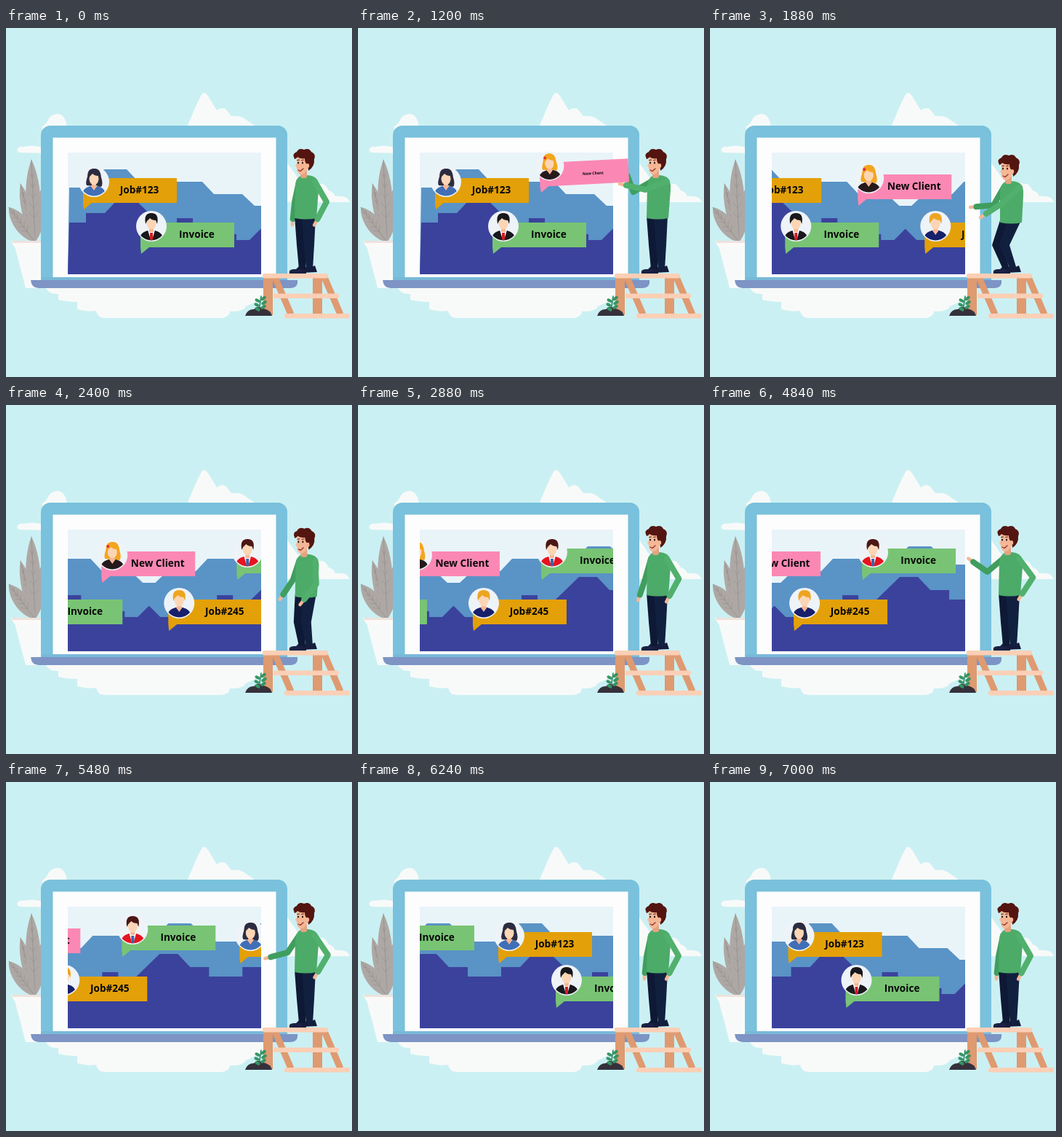
Write an HTML page with a canvas that moves like this. It is 476x479 px and loops after 7.04 s.

```html
<!DOCTYPE html>
<html lang="en">
<head>
<meta charset="utf-8">
<title>Scrolling job board</title>
<style>
html, body { margin: 0; width: 100%; height: 100%; overflow: hidden; background: #cbf0f3; }
canvas { display: block; }
</style>
</head>
<body>
<canvas id="stage" width="476" height="479"></canvas>
<script>
const ctx = document.getElementById('stage').getContext('2d');
const LOOP = 7040, STEP = 40, PERIOD = 527, MIRROR = 350.5;
const SCREEN = [85, 171, 266, 167];
const CARD_LANDS = 1560;
const SKIN = '#f5b795', NAVY = '#12203f', GREEN = '#4cab68', HAIR = '#541510', WHITE = '#f8faf9';

const clamp = (v, lo, hi) => Math.min(hi, Math.max(lo, v));
const mix = (a, b, p) => a + (b - a) * p;
const ease = (t, from, to) => {
  const p = clamp((t - from) / (to - from), 0, 1);
  return p * p * (3 - 2 * p);
};

// A skyline is a row of plateaus [from, to, top]; its other half is the mirror image
function skyline(plateaus) {
  const half = plateaus.flatMap(([from, to, top]) => [[from, top], [to, top]]);
  const whole = [...half, ...half.map(([x, y]) => [2 * MIRROR - x, y]).reverse()];
  return [[85, 338], ...whole, ...whole.map(([x, y]) => [x + PERIOD, y]), [85 + 2 * PERIOD, 338]];
}
const hills = skyline([[87, 108, 219], [135, 166, 194], [182, 270, 211], [286, 325, 228], [342, 350, 244]]);
const towers = skyline([[87, 110, 267], [110, 136, 254], [153, 178, 236], [210, 235, 267], [235, 257, 261],
  [257, 296, 267], [296, 317, 283], [317, 335, 291], [350, 350, 276]]);

const JOB = '#e3a008', BILL = '#78c474', CLIENT = '#fb88b4';
const cards = [
  { x: 106, y: 206, fill: JOB, text: 'Job#123', face: { hair: '#2c2c40', suit: '#416fb6', bob: true } },
  { x: 185, y: 267, fill: BILL, text: 'Invoice', face: { hair: '#17171c', suit: '#18181d', tie: '#d21c24' } },
  { x: 377, y: 267, fill: JOB, text: 'Job#245', face: { hair: '#eda520', suit: '#17206a' } },
  { x: 471, y: 197, fill: BILL, text: 'Invoice', face: { hair: '#4b1714', suit: '#e5141f', tie: '#3a63a8' } }
];
const newClient = { x: 285, y: 201, fill: CLIENT, text: 'New Client',
  face: { hair: '#f3a61d', suit: '#25191c', bob: true, flower: true } };

// Angles in degrees (90 hangs straight down): near upper arm, near forearm,
// far upper arm, far forearm; then how far the body leans
const idle = [60, 118, 102, 96, 0];
const hold = [160, 193, 150, 250, 0];
const push = [138, 147, 120, 175, 1];
const point = [53, 123, 140, 215, 0];
const moves = [[0, 720, hold], [1240, 1880, push], [1920, 2720, idle], [2680, 3680, point], [5000, 6080, idle]];

function poseAt(t) {
  return moves.reduce((pose, [from, to, goal]) => {
    const p = ease(t, from, to);
    return pose.map((v, i) => mix(v, goal[i], p));
  }, idle);
}

// A quick start with a long slowdown, then a second eased run to the loop point
function scrollAt(t) {
  const run = clamp(t - 1240, 0, 2360);
  const travelled = run < 100 ? run * run / 200 : run - 50;
  const first = .1385 * (travelled - Math.max(0, run - 1522) ** 2 / 1676);
  return first + 265 * ease(t, 4860, 7097);
}

function poly(points, fill) {
  ctx.beginPath();
  points.forEach(([x, y]) => ctx.lineTo(x, y));
  ctx.fillStyle = fill;
  ctx.fill();
}
function shape(d, fill) { ctx.fillStyle = fill; ctx.fill(new Path2D(d)); }
function rect(x, y, w, h, fill, r = 0) {
  ctx.beginPath();
  ctx.roundRect(x, y, w, h, r);
  ctx.fillStyle = fill;
  ctx.fill();
}
function oval(x, y, rx, ry, fill, turn = 0) {
  ctx.beginPath();
  ctx.ellipse(x, y, rx, ry, turn, 0, 7);
  ctx.fillStyle = fill;
  ctx.fill();
}
function line(points, color, width, cap = 'round') {
  ctx.beginPath();
  points.forEach(([x, y]) => ctx.lineTo(x, y));
  Object.assign(ctx, { strokeStyle: color, lineWidth: width, lineCap: cap, lineJoin: 'round' });
  ctx.stroke();
}
function placed(x, y, paint) {
  ctx.save();
  ctx.translate(x, y);
  paint();
  ctx.restore();
}

// A pointed leaf from the pot up to its tip, with a vein and ribs
function drawLeaf(tipX, tipY, width) {
  const baseX = 40, baseY = 294, vein = '#958f8d';
  const length = Math.hypot(tipX - baseX, tipY - baseY);
  placed(baseX, baseY, () => {
    ctx.rotate(Math.atan2(tipX - baseX, baseY - tipY));
    shape(`M0 0C${-width} ${-length * .3} ${-width * .7} ${-length * .8} 0 ${-length}`
      + `C${width * .7} ${-length * .8} ${width} ${-length * .3} 0 0Z`, '#aea8a5');
    line([[0, 0], [0, -length]], vein, .8);
    for (let p = .3; p < .85; p += .12) {
      const reach = width * .45 * (1.1 - p);
      line([[-reach, -length * p - 6], [0, -length * p], [reach, -length * p - 6]], vein, .6);
    }
  });
}

function drawScenery() {
  rect(0, 0, 476, 479, '#cbf0f3');
  shape('M249 136L260 110Q267 94 271 89Q275 88 279 95L290 113Q296 108 302 111L310 121Q320 120 326 123L345 136Z', WHITE);
  shape('M15 168Q16 162 25 163Q38 160 50 164L50 135Q55 132 57 128Q61 118 71 118Q81 118 84 135L60 172L18 171Z', WHITE);
  shape('M386 184L401 205L432 214Q438 212 444 223Q451 225 453 231Q470 229 473 239L386 239Z', WHITE);
  shape('M54 355Q58 366 72 365V373Q84 376 98 376V386Q112 390 124 388Q126 398 136 398H297Q307 397 308 389Q326 390 330 382L352 372L360 355Z', WHITE);

  drawLeaf(52, 216, 13);
  drawLeaf(20, 214, 12);
  drawLeaf(35, 181, 16);
  drawLeaf(4, 246, 16);
  shape('M7 292H56V300H11Z', '#fcfaf8');
  shape('M12 300H56V357H27Z', WHITE);
  shape('M8 292H56L55 295H9Z', '#eee2dd');

  rect(48, 134, 339, 218, '#79c1dc', 13);
  rect(64.5, 150.5, 307, 191.5, '#fdfdfe');
  shape('M34 346H401V350Q400 357 391 357H45Q35 357 34 346Z', '#7d94c5');
  rect(48, 342, 339, 4, '#79b9d8');
}

function drawStool() {
  const wood = '#df9a70', plank = '#fbcfb5';
  for (const x of [354, 422]) {
    line([[x + 16, 342], [x + 38, 393]], wood, 9, 'butt');
    rect(x, 341, 13, 53, wood);
  }
  for (let step = 0; step < 3; step++) rect(353 + step * 15, 337 + step * 27.5, 90, 6.5, plank, 2);

  shape('M329 395Q332 386 341 386Q347 380 354 385Q364 387 366 395Z', '#35313b');
  line([[348, 388], [351, 368]], '#2f875a', 1.6);
  for (let i = 0; i < 3; i++) {
    oval(346 - i % 2, 386 - i * 6, 3.8, 2.1, '#379465', .5);
    oval(354 + i % 2, 383 - i * 6, 4.2, 2.2, '#379465', -.6);
  }
}

function drawAvatar({ hair, suit, tie, bob, flower }) {
  ctx.save();
  oval(0, 0, 21, 21, '#eef3f8');
  ctx.beginPath();
  ctx.arc(0, 0, 19.5, 0, 7);
  ctx.clip();
  if (bob) shape('M-10 5Q-12 2 -9 -7Q-8 -18 1 -18Q9 -18 10 -6Q13 3 10 7Z', hair);
  shape('M-16 20Q-17 9 -5 6H5Q17 9 16 20Z', suit);
  shape(tie ? 'M-5 5H5L1 19H-1Z' : 'M-5 5H5L0 12Z', tie ? '#fff' : SKIN);
  rect(-3, 1, 6, 7, SKIN);
  if (tie) poly([[-2, 9], [2, 9], [2, 18], [0, 20], [-2, 18]], tie);
  oval(0, -4, 6.5, 8.5, '#fcd5b5');
  shape('M-8 -3Q-11 -18 0 -18Q11 -18 8 -3L6 -8Q1 -8 -2 -11L-6 -7Z', hair);
  if (flower) oval(-6, -12, 2, 2, '#e42b39');
  ctx.restore();
}

function drawCard({ fill, text, face }, x, y, textScale = 1) {
  placed(x, y, () => {
    poly([[0, 0], [129, 0], [129, 34], [12, 34], [1, 43], [0, 34]], fill);
    placed(15, 5, () => drawAvatar(face));
    ctx.translate(77.5, 20.5);
    ctx.scale(textScale, textScale);
    ctx.font = 'bold 13.6px "Open Sans", "Noto Sans", sans-serif';
    ctx.textAlign = 'center';
    ctx.fillStyle = '#080808';
    ctx.fillText(text, 0, 0);
  });
}

function drawScreen(t) {
  ctx.save();
  ctx.beginPath();
  ctx.rect(...SCREEN);
  ctx.clip();
  rect(...SCREEN, '#e9f4f9');
  ctx.translate(-scrollAt(t), 0);
  poly(hills, '#5a93c6');
  poly(towers, '#3b429c');
  for (const shift of [0, PERIOD]) cards.forEach(c => drawCard(c, c.x + shift, c.y));
  if (t >= CARD_LANDS) drawCard(newClient, newClient.x, newClient.y);
  ctx.restore();
}

// The card grows out from behind the man, then settles onto the strip
function drawCarriedCard(t) {
  if (t < 200 || t >= CARD_LANDS) return;
  const rise = ease(t, 200, 1000), settle = ease(t, 1200, CARD_LANDS);
  placed(mix(416, 311, rise), mix(250, 199, rise) + 19.5 * settle, () => {
    const scale = mix(.15, .95, rise) + .05 * settle;
    ctx.rotate(-mix(.5, .05, rise) * (1 - settle));
    ctx.scale(scale, scale);
    drawCard(newClient, -64.5, -17.5, mix(.2, .41, rise) + .59 * settle);
  });
}

function drawArm(shoulder, angles, lengths, color) {
  const swing = ([x, y], degrees, length) => {
    const a = degrees * Math.PI / 180;
    return [x + length * Math.cos(a), y + length * Math.sin(a)];
  };
  const elbow = swing(shoulder, angles[0], lengths[0]);
  const wrist = swing(elbow, angles[1], lengths[1] * .74);
  const hand = swing(elbow, angles[1], lengths[1]);
  line([wrist, hand], SKIN, 4.5);
  line([shoulder, elbow, wrist], color, 8);
}

function drawHead() {
  rect(405, 194, 9, 12, '#e5a381', 3);
  shape('M400 176H416Q419 188 413 196Q409 203 403 200Q400 197 400 192L398 189L400 186Z', SKIN);
  shape('M397 180Q393 172 400 170Q403 164 410 167Q417 164 420 170Q427 173 424 180Q425 190 416 196L415 187Q411 186 411 179Q405 180 401 177Q399 180 397 180Z', HAIR);
  oval(415, 189, 2.2, 3, SKIN);
  for (const x of [402, 408]) {
    oval(x, 185, 1, 1.5, '#271516');
    line([[x - 1.5, 181.5], [x + 1.5, 181]], HAIR, 1);
  }
  line([[402, 195], [405, 196.5], [409, 193]], '#8f332d', 1.3);
}

function drawMan(pose) {
  const lean = pose[4], chestX = lean, chestY = 8 * lean, hipX = 2 * lean, hipY = 6 * lean, knee = -12 * lean;
  shape('M390 337Q388 330 399 331L404 326L413 328V337Z', '#1a2143');
  shape('M406 336Q405 331 416 330L425 326L428 335Z', '#151c3b');
  const leg = (x, color) => poly([[x + hipX, 258 + hipY], [x + 19 + hipX, 258 + hipY], [x + 17 + knee, 298],
    [x + 15, 331], [x + 6, 331], [x + 3 + knee, 298]], color);
  leg(397, '#0e1935');
  leg(407, NAVY);

  const chest = (x, y) => `${x + chestX} ${y + chestY} `, hip = (x, y) => `${x + hipX} ${y + hipY} `;
  shape('M' + chest(405, 203) + 'Q' + chest(417, 200) + chest(425, 205) + 'Q' + chest(431, 209) + chest(430, 222)
    + 'L' + hip(427, 261) + 'Q' + hip(413, 264) + hip(397, 261)
    + 'L' + chest(398, 216) + 'Q' + chest(399, 206) + chest(405, 203) + 'Z', GREEN);
  placed(chestX, chestY, drawHead);
  drawArm([425 + chestX, 211 + chestY], pose, [32, 36], '#51b06d');
}

function draw() {
  const t = Math.floor(performance.now() % LOOP / STEP) * STEP;
  const pose = poseAt(t), lean = pose[4];
  drawScenery();
  drawScreen(t);
  drawStool();
  drawArm([403 + lean, 211 + 8 * lean], pose.slice(2), [28, 32], '#3f9e5e');
  drawCarriedCard(t);
  drawMan(pose);
  requestAnimationFrame(draw);
}
draw();
</script>
</body>
</html>
```
